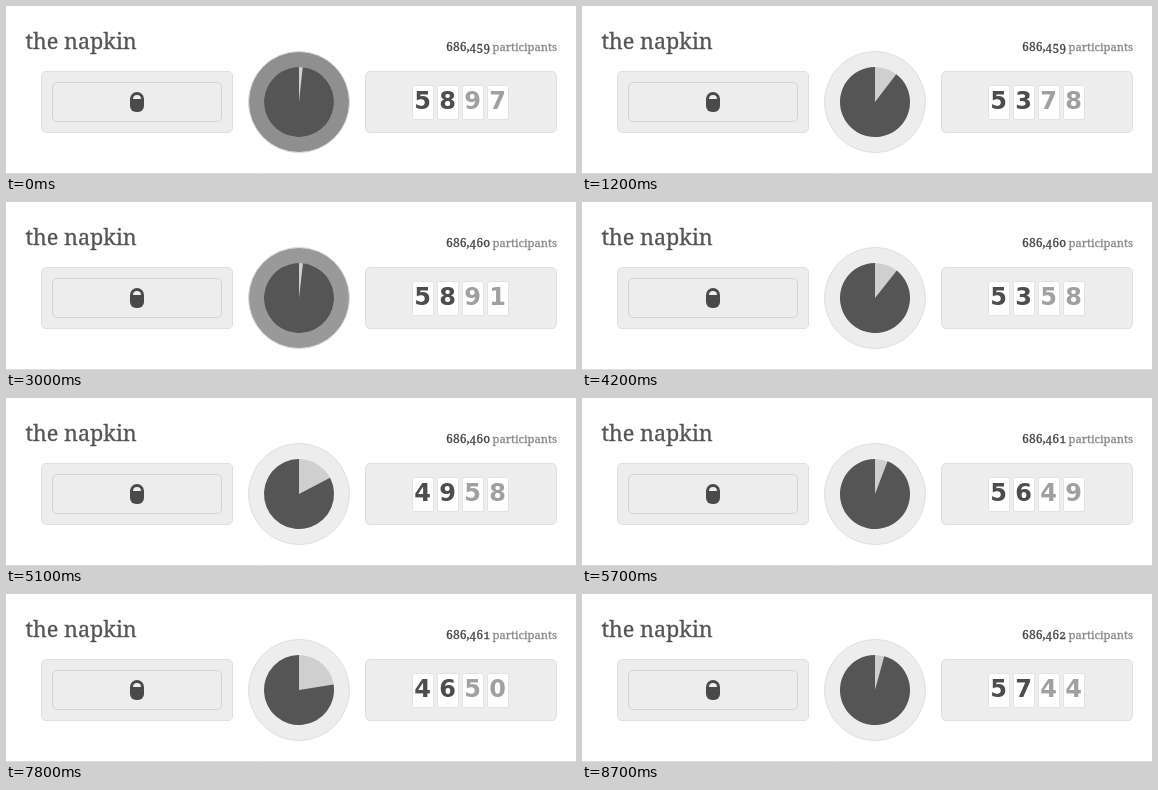
An HTML page for the animation above (9000 ms loop, 570x168 px).

```html
<!DOCTYPE html>
<html lang="en">
<head>
<meta charset="utf-8">
<title>the napkin</title>
<style>
  html, body { margin: 0; width: 100%; height: 100%; overflow: hidden; background: #fff; }
  svg { display: block; }
  .serif {
    font-family: "Noto Serif", serif; font-variant-numeric: oldstyle-nums;
    fill: currentColor; stroke: currentColor; stroke-width: .3;
  }
  .panel { fill: #ededed; stroke: #dfdfdf; }
  .digit { font: bold 24px "DejaVu Sans", sans-serif; text-anchor: middle; }
</style>
</head>
<body>
<svg width="570" height="168" viewBox="0 0 570 168">
  <text class="serif" x="19.5" y="43" font-size="21.6" color="#555">the napkin</text>
  <text class="serif" id="count" x="484" y="45" font-size="11.8" color="#444" text-anchor="end"></text>
  <text class="serif" x="551" y="45" font-size="11.2" color="#888" text-anchor="end">participants</text>

  <rect class="panel" x="35.5" y="65.5" width="191" height="61" rx="4.5"/>
  <rect x="46.5" y="76.5" width="169" height="39" rx="4.5" fill="#ededed" stroke="#d3d3d3"/>
  <path d="M124 93a7 7 0 0 1 14 0v7a6 6 0 0 1-6 6h-2a6 6 0 0 1-6-6z" fill="#4a4a4a"/>
  <path d="M127 93a4 4 0 0 1 8 0z" fill="#ededed"/>

  <rect class="panel" x="359.5" y="65.5" width="191" height="61" rx="4.5"/>
  <g id="cards"></g>

  <circle id="ring" cx="293" cy="96" r="50.5" stroke="#dfdfdf"/>
  <circle cx="293" cy="96" r="35" fill="#cfcfcf"/>
  <path id="remaining" fill="#555"/>
  <path d="M0 167.5H570" stroke="#dcdcdc"/>
</svg>
<script>
  const STEP = 300, STEPS = 30;
  const IDLE_RING = "#ededed";

  // Each press restarts the countdown; drop is the seconds lost per step.
  const presses = [
    { start: 0, seconds: 58.97, drop: 1.2975, count: "686,459", flash: "#8f8f8f" },
    { start: 10, seconds: 58.91, drop: 1.3325, count: "686,460", flash: "#999" },
    { start: 18, seconds: 57.9175, drop: 1.4275, count: "686,461" },
    { start: 28, seconds: 58.8, drop: 1.36, count: "686,462" }
  ];

  const byId = id => document.getElementById(id);
  const count = byId("count"), ring = byId("ring"), remaining = byId("remaining");

  function add(parent, tag, attributes) {
    const node = document.createElementNS("http://www.w3.org/2000/svg", tag);
    for (const name in attributes) node.setAttribute(name, attributes[name]);
    return parent.appendChild(node);
  }

  const digits = [0, 1, 2, 3].map(i => {
    const x = 406.5 + 25 * i;
    add(byId("cards"), "rect", { x, y: 79.5, width: 21, height: 34, rx: 2, fill: "#fff", stroke: "#e2e2e2" });
    return add(byId("cards"), "text", { class: "digit", x: x + 10, y: 103, fill: i < 2 ? "#4d4d4d" : "#a0a0a0" });
  });

  function sector(seconds) {
    const angle = (60 - seconds) * Math.PI / 30;
    const x = 293 + 35 * Math.sin(angle), y = 96 - 35 * Math.cos(angle);
    return `M293 96L${x} ${y}A35 35 0 ${angle < Math.PI ? 1 : 0} 1 293 61Z`;
  }

  function draw(now) {
    const step = Math.floor(now / STEP) % STEPS;
    const press = presses.findLast(p => p.start <= step);
    const age = step - press.start;
    const seconds = press.seconds - age * press.drop;
    const shown = String(Math.round(seconds * 100)).padStart(4, "0");

    digits.forEach((digit, i) => digit.textContent = shown[i]);
    count.textContent = press.count;
    remaining.setAttribute("d", sector(seconds));
    ring.setAttribute("fill", age === 0 && press.flash || IDLE_RING);
  }

  const origin = performance.now();
  function tick() {
    draw(performance.now() - origin);
    requestAnimationFrame(tick);
  }
  tick();
</script>
</body>
</html>
```
